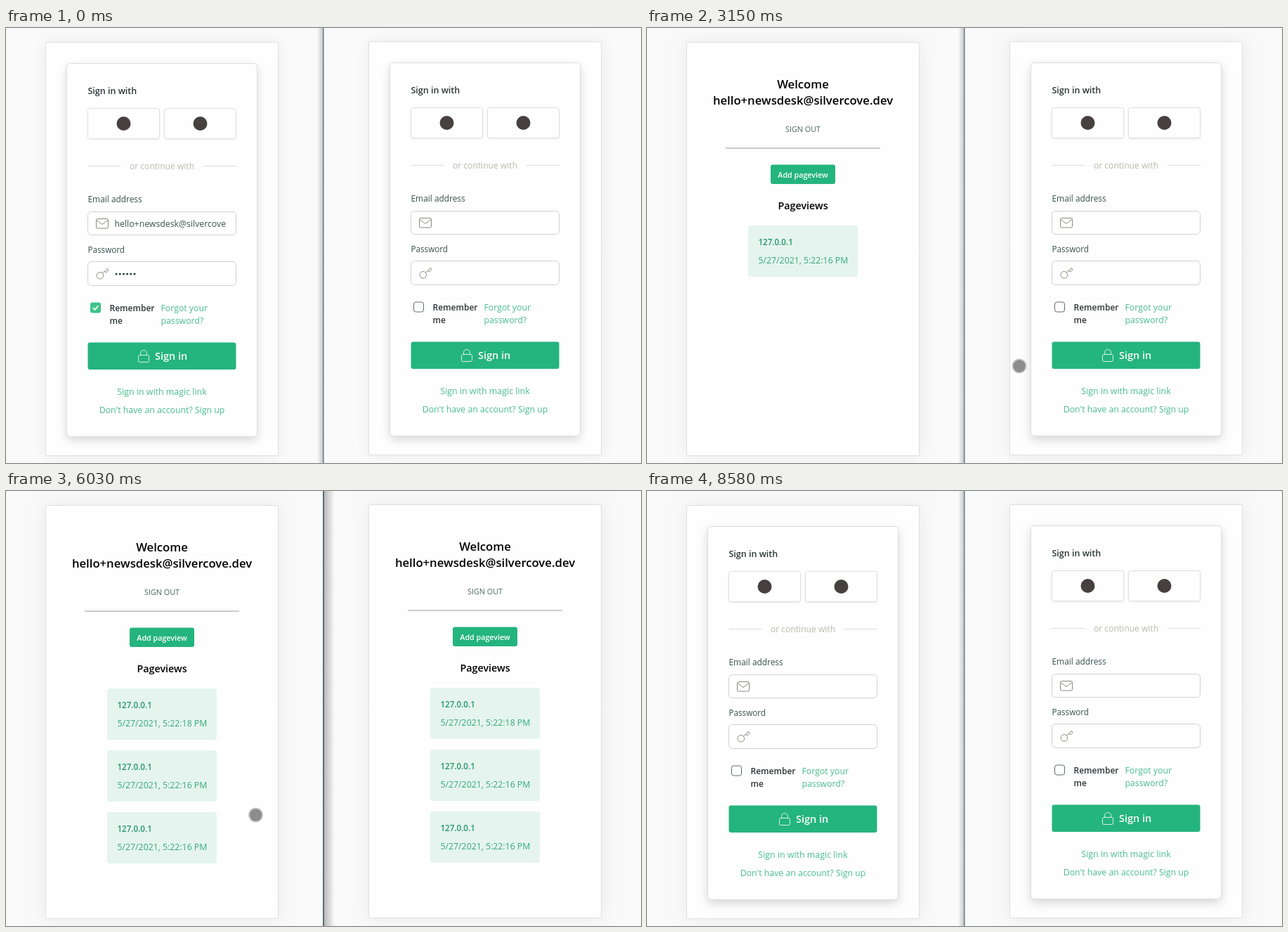
Recreate the animation shown at these times as an HTML page with a canvas. Size 904 px wide and 619 px high, loop 9.11 s.

```html
<!DOCTYPE html>
<html lang="en">
<head>
<meta charset="utf-8">
<title>Two sign-in windows</title>
<style>
  html, body { margin: 0; width: 100%; height: 100%; overflow: hidden; background: #fafafa; }
  canvas { display: block; }
</style>
</head>
<body>
<canvas id="stage" width="904" height="619"></canvas>
<script>
const g = document.getElementById('stage').getContext('2d');
const LOOP = 9110, GREEN = '#24b47e', LINK = '#4abd8e';
const MAIL = 'hello+newsdesk@silvercove.dev';

// Pointer moves: start, end, steps, x, y
const START = [567, 488];
const MOVES = [
  [70, 970, 14, 213.5, 466.5],
  [1040, 1040, 1, 205.5, 466.5],
  [1440, 2120, 11, 470, 465],
  [2190, 2400, 4, 798, 478],
  [2470, 2950, 7, 530, 481],
  [3960, 4660, 11, 668.5, 211],
  [5140, 5890, 11, 355.5, 461],
  [6690, 7040, 6, 222, 147],
  [7510, 7720, 4, 537, 343],
  [8440, 8510, 2, 706, 540]
];

// Seconds shown on the pageview cards, from a given time on
const OLD = ['21:58', '21:56', '21:54', '21:54'];
const LEFT_CARDS = [[0, OLD], [3150, ['22:16']], [6030, ['22:18', '22:16', '22:16']]];
const RIGHT_CARDS = [
  [0, OLD],
  [3430, ['22:16', ...OLD.slice(0, 3)]],
  [3500, ['22:16', '22:16', ...OLD.slice(0, 2)]],
  [3700, ['22:16', '22:16']],
  [4940, ['22:18', '22:16', '22:16', OLD[0]]],
  [5140, ['22:18', '22:16', '22:16']]
];

const between = (t, a, b) => t >= a && t < b;
const latest = (list, t) => list.filter(([from]) => t >= from).pop()[1];

function text(s, x, y, size, color, weight = 400, align = 'left') {
  g.font = `${weight} ${size}px "Open Sans", "Noto Sans", sans-serif`;
  g.fillStyle = color;
  g.textAlign = align;
  g.fillText(s, x, y);
}

function box(x, y, w, h, r, fill, stroke) {
  g.beginPath();
  g.roundRect(x, y, w, h, r);
  if (fill) { g.fillStyle = fill; g.fill(); }
  g.shadowColor = 'transparent';
  if (stroke) { g.strokeStyle = stroke; g.lineWidth = 1; g.stroke(); }
}

function shadow(color, blur, y) {
  g.shadowColor = color;
  g.shadowBlur = blur;
  g.shadowOffsetY = y;
}

function disc(x, y, r, color) {
  g.beginPath();
  g.arc(x, y, r, 0, 7);
  g.fillStyle = color;
  g.fill();
}

function path(d, color, width = 1) {
  g.strokeStyle = color;
  g.lineWidth = width;
  g.stroke(new Path2D(d));
}

function form(filled) {
  shadow('rgba(0,0,0,.16)', 14, 5);
  box(86.5, 50.5, 271, 531, 5, '#fefefe', '#dedede');
  text('Sign in with', 116.5, 94, 12.5, '#2a3634', 600);
  for (const x of [116.5, 225.5]) {
    shadow('rgba(0,0,0,.1)', 3, 1);
    box(x, 114.5, 102, 43, 3, '#fefefe', '#dedee0');
    disc(x + 51, 136, 10, '#464040');
  }
  path('M117 196.5H163M281 196.5H328', '#dcdcdc');
  text('or continue with', 222, 201, 12.1, '#b9b9aa', 400, 'center');

  text('Email address', 116.5, 248, 11.9, '#37524c');
  box(116.5, 261.5, 211, 33, 5, '#fff', '#d0d0d6');
  box(128.5, 271.5, 17, 13.5, 2, null, '#88887e');
  path('M129 273.5L137 279.5L145 273.5', '#88887e');
  text('Password', 116.5, 320, 11.7, '#37524c');
  box(116.5, 332.5, 211, 34, 5, '#fff', '#d0d0d6');
  path('M138.6 352.3a4.8 4.8 0 1 1-9.6 0a4.8 4.8 0 1 1 9.6 0M137.3 349L144.5 342.3L145.8 345L143 347.6L140 346.6', '#88887e');

  if (filled) {
    g.save();
    g.beginPath();
    g.rect(154, 262, 159, 32);
    g.clip();
    text(MAIL, 154.5, 283, 12.3, '#37524c');
    g.restore();
    for (let i = 0; i < 6; i++) disc(157 + i * 5.2, 350, 1.6, '#2f4440');
    box(120, 390.5, 15, 15, 3, '#3fc48b');
    path('M123.8 398.2L126.5 401L131.3 395.4', '#fff', 1.8);
  } else {
    box(120.5, 391, 14, 14, 3, '#fff', '#606a6a');
  }
  text('Remember', 147.5, 402.5, 12, '#2a3634', 600);
  text('me', 147.5, 420.5, 12, '#2a3634', 600);
  text('Forgot your', 220.5, 402.5, 12.3, LINK);
  text('password?', 220.5, 420.5, 12.3, LINK);

  box(116.5, 447.5, 211, 38.5, 3, GREEN);
  box(188.5, 465.5, 15, 10, 2, null, '#d8f2e6');
  path('M191.5 465V462.5a4.5 4 0 0 1 9 0V465', '#d8f2e6');
  text('Sign in', 212, 472, 14.5, '#fff', 600);
  text('Sign in with magic link', 222, 521.5, 12.4, LINK, 400, 'center');
  text("Don't have an account? Sign up", 222, 547.5, 12.3, LINK, 400, 'center');
}

function welcome(cards, pressed) {
  text('Welcome', 222, 86, 16.7, '#000', 600, 'center');
  text(MAIL, 222, 109, 16.7, '#000', 600, 'center');
  text('SIGN OUT', 222, 147.5, 10.8, '#4a6854', 400, 'center');
  path('M112 171H332', '#9c9a9c', 1.2);
  box(176, 194.5, 92, 27.5, 3, pressed ? '#48c4b8' : GREEN);
  text('Add pageview', 222, 213, 10.7, pressed ? '#a4e2da' : '#fff', 600, 'center');
  text('Pageviews', 222, 258, 14.3, '#000', 600, 'center');
  cards.forEach((time, i) => {
    const y = 281 + 88 * i;
    box(144, y, 156, 73, 4, '#e5f4ee');
    text('127.0.0.1', 158.5, y + 28, 11.6, '#25976c', 600);
    text(`5/27/2021, 5:${time} PM`, 158.5, y + 54, 12.3, '#35a880');
  });
}

function panel(dx, dy, content) {
  g.save();
  g.translate(dx, dy);
  shadow('rgba(0,0,0,.07)', 22, 0);
  box(56.5, 20.5, 331, 588, 0, '#fefefe', '#e0e0e0');
  g.beginPath();
  g.rect(57, 21, 330, 587);
  g.clip();
  content();
  g.restore();
}

function divider(leftActive) {
  const [a, b] = leftActive ? [453, 468] : [451, 443];
  const shade = g.createLinearGradient(a, 0, b, 0);
  shade.addColorStop(0, leftActive ? 'rgba(0,0,0,.26)' : 'rgba(0,0,0,.2)');
  shade.addColorStop(1, 'rgba(0,0,0,0)');
  g.fillStyle = shade;
  g.fillRect(Math.min(a, b), 0, Math.abs(a - b), 619);
  g.fillStyle = leftActive ? '#5b7074' : '#6f7f88';
  g.fillRect(451, 0, leftActive ? 2 : 1.6, 619);
}

function pointer(t) {
  let [x, y] = START;
  for (const [from, to, n, px, py] of MOVES) {
    if (t < from) break;
    const step = Math.floor((t - from) / (to - from || 1) * (n - 1) + .001);
    const p = Math.min(1, (step + 1) / n), e = p * p * (3 - 2 * p);
    x += (px - x) * e;
    y += (py - y) * e;
  }
  // Touch dot inside the panels, arrow elsewhere
  if (between(x, 56, 388) || between(x, 516, 848)) {
    disc(x, y, 10.5, 'rgba(120,120,120,.4)');
    g.globalCompositeOperation = 'source-over';
    disc(x, y, 8.7, 'rgba(60,60,60,.42)');
  } else {
    g.save();
    g.translate(x, y);
    const arrow = new Path2D('M.5 .5V14.5L3.8 11.5L6 17L8.3 16L6 10.7H10.2Z');
    g.fillStyle = '#fff';
    g.fill(arrow);
    g.strokeStyle = '#222';
    g.lineWidth = 1;
    g.stroke(arrow);
    g.restore();
  }
}

function draw(now) {
  const t = now % LOOP;
  g.fillStyle = '#fafafa';
  g.fillRect(0, 0, 904, 619);
  panel(0, 0, () => between(t, 2260, 7240)
    ? welcome(latest(LEFT_CARDS, t), false) : form(t < 1440));
  panel(460, -1, () => between(t, 3230, 8040)
    ? welcome(latest(RIGHT_CARDS, t), between(t, 4660, 4940)) : form(false));
  divider(between(t, 970, 2950) || between(t, 5890, 7980));
  if (between(t, 70, 8580)) pointer(t);
  requestAnimationFrame(draw);
}
requestAnimationFrame(draw);
</script>
</body>
</html>
```
